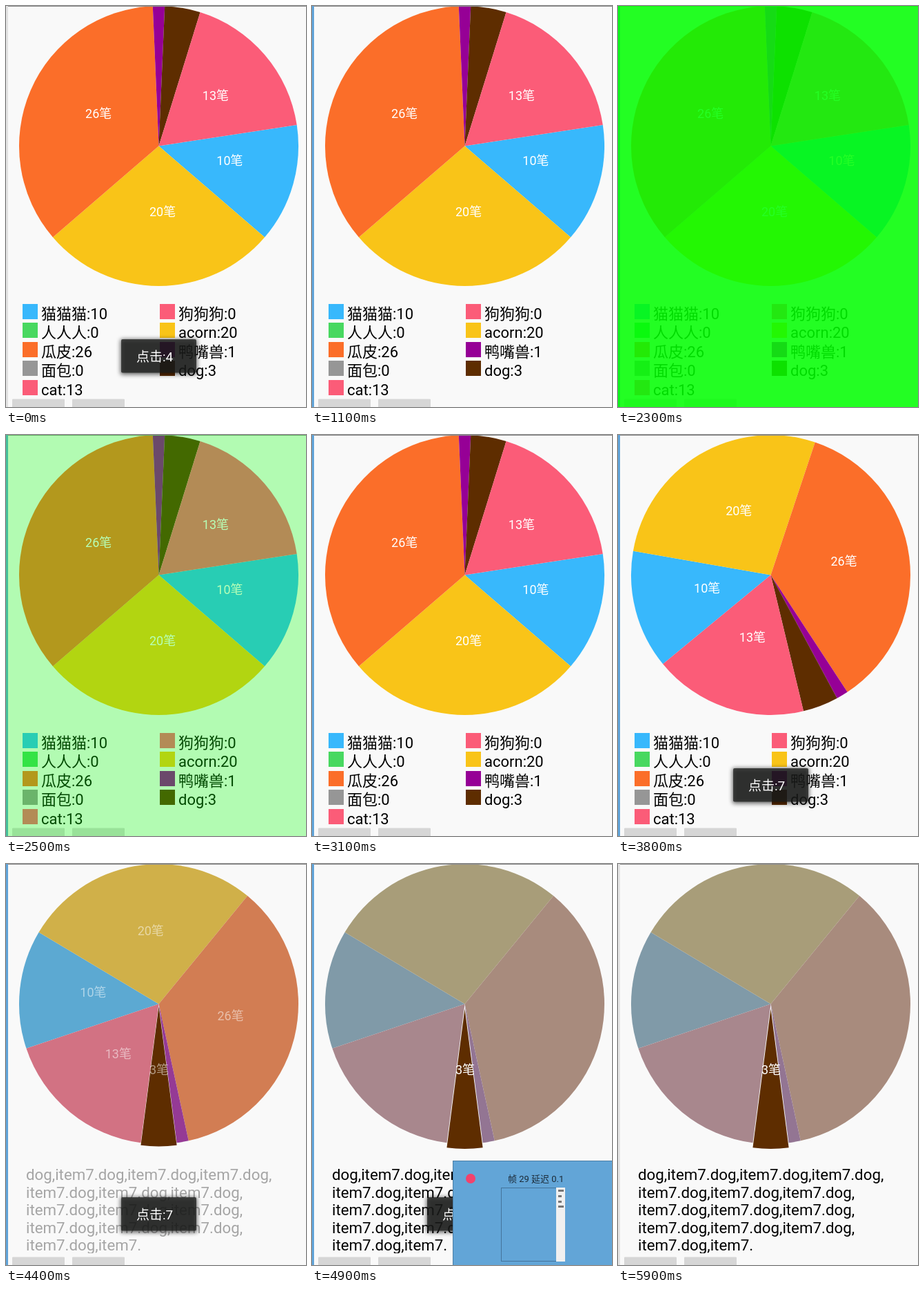
An HTML page for the animation above (7100 ms loop, 435 by 580 pixels).

```html
<!DOCTYPE html>
<html lang="zh-CN">
<head>
<meta charset="utf-8">
<title>Pie chart</title>
<style>
html, body { margin: 0; width: 100%; height: 100%; overflow: hidden; background: #f9f9f9; }
svg { display: block; width: 435px; height: 580px; }
text { font-family: Roboto, "Noto Sans CJK SC", "Noto Sans CJK", sans-serif; white-space: pre; }
</style>
</head>
<body>
<svg id="stage" viewBox="0 0 435 580" xmlns="http://www.w3.org/2000/svg">
  <defs>
    <filter id="soft" x="-20%" y="-40%" width="140%" height="180%"><feGaussianBlur stdDeviation="3"/></filter>
    <clipPath id="detailClip"><rect x="0" y="425" width="435" height="138"/></clipPath>
  </defs>
  <rect width="435" height="580" fill="#f9f9f9"/>
  <g id="pie"></g>
  <g id="labels" font-size="18" fill="#fff"></g>
  <g id="legend" font-size="22"></g>
  <g id="detail" font-size="22.3" clip-path="url(#detailClip)"></g>
  <g fill="#d6d6d6">
    <rect x="9" y="568.5" width="76" height="14" rx="1"/>
    <rect x="96" y="568.5" width="76" height="14" rx="1"/>
  </g>
  <rect width="435" height="1" fill="#8c8c8c"/>
  <g id="toast">
    <rect x="166" y="482" width="111" height="51" rx="2" fill="#000" opacity=".6" filter="url(#soft)"/>
    <rect x="167" y="482" width="109" height="48.5" rx="2" fill="#1c1e1d" fill-opacity=".75"/>
    <text id="toastText" x="189" y="514" font-size="19" fill="#fff"></text>
  </g>
  <rect id="edge" width="3" height="580"/>
  <g id="popup">
    <rect x="204.5" y="429.5" width="232" height="152" fill="#62a5d7" stroke="#4b7ea6"/>
    <circle cx="230" cy="455" r="7" fill="#f2426c"/>
    <text id="popupText" x="284" y="460" font-size="13" fill="#1c2b38"></text>
    <rect x="274.5" y="468.5" width="80" height="106" fill="none" stroke="#44749b"/>
    <rect x="354" y="468" width="13" height="107" fill="#f0f0f0"/>
    <g id="tools" fill="#777"></g>
  </g>
  <rect id="flash" width="435" height="580" fill="#0f0"/>
</svg>
<script>
const LOOP = 7100, STEP = 100;
const CX = 221.5, CY = 202.5, R = 202.5, LABEL_R = 101.25;
const PICKED = 7, FIRST_TURN = -8.63, LAST_TURN = 161.5;
const items = [
  ['猫猫猫', 10, [56, 184, 252]],
  ['狗狗狗', 0, [251, 92, 120]],
  ['人人人', 0, [72, 216, 96]],
  ['acorn', 20, [249, 196, 24]],
  ['瓜皮', 26, [251, 110, 41]],
  ['鸭嘴兽', 1, [150, 0, 150]],
  ['面包', 0, [150, 150, 150]],
  ['dog', 3, [94, 45, 0]],
  ['cat', 13, [251, 92, 120]]
];
const total = items.reduce((sum, item) => sum + item[1], 0);

const $ = id => document.getElementById(id);
const clamp = v => Math.max(0, Math.min(1, v));
const span = (t, from, to) => clamp((t - from) / (to - from));
const ease = p => (1 - Math.cos(Math.PI * p)) / 2;
const mix = (a, b, p) => a + (b - a) * p;
const rgb = c => `rgb(${c.map(Math.round)})`;
const show = (node, alpha) => {
  node.setAttribute('opacity', alpha);
  node.style.display = alpha > 0 ? '' : 'none';
};

function add(parent, tag, attrs, text) {
  const node = document.createElementNS('http://www.w3.org/2000/svg', tag);
  for (const key in attrs) node.setAttribute(key, attrs[key]);
  if (text) node.textContent = text;
  return $(parent).appendChild(node);
}

function polar(deg, r) {
  const a = deg * Math.PI / 180;
  return [CX + r * Math.cos(a), CY + r * Math.sin(a)];
}

let sum = 0;
const slices = [];
items.forEach(([name, value, color], i) => {
  const col = i % 2, row = i >> 1;
  const y = 27.4 * row;
  add('legend', 'rect', { x: col ? 223 : 24, y: Math.round(431 + y), width: 22, height: 22, fill: rgb(color) });
  add('legend', 'text', { x: col ? 250 : 51, y: 453 + y }, `${name}:${value}`);
  if (!value) return;
  const from = sum / total * 360;
  sum += value;
  slices.push({
    from, to: sum / total * 360, color, value,
    picked: i === PICKED,
    path: add('pie', 'path', {}),
    label: add('labels', 'text', {}, value + '笔')
  });
});

const pair = 'item7.dog,';
['dog,' + pair.repeat(3), pair.repeat(3), pair.repeat(3), pair.repeat(3), pair + 'item7.']
  .forEach((line, i) => add('detail', 'text', { x: 29, y: 457 + 25.5 * i }, line));

[471, 479, 487, 494].forEach((y, i) =>
  add('tools', 'rect', { x: 357, y, width: i % 3 ? 5 : 8, height: 3 }));

function drawPie(turn, focus) {
  for (const s of slices) {
    const [x1, y1] = polar(s.from + turn, R);
    const [x2, y2] = polar(s.to + turn, R);
    const mid = (s.from + s.to) / 2 + turn;
    s.path.setAttribute('d', `M${CX} ${CY}L${x1} ${y1}A${R} ${R} 0 0 1 ${x2} ${y2}Z`);
    s.path.setAttribute('fill', rgb(s.picked ? s.color : s.color.map(c => mix(c, c * 0.206 + 116.5, focus))));
    const [px, py] = polar(mid, 7 * focus);
    s.path.setAttribute('transform', s.picked ? `translate(${px - CX} ${py - CY})` : '');
    const [lx, ly] = polar(mid, LABEL_R);
    s.label.setAttribute('x', lx - 13.5);
    s.label.setAttribute('y', ly);
    show(s.label, s.picked ? focus : s.value < 5 ? 0 : 1 - focus);
  }
}

function draw(now) {
  const t = Math.floor(now % LOOP / STEP) * STEP;

  drawPie(mix(FIRST_TURN, LAST_TURN, ease(span(t, 3100, 4007))), ease(span(t, 4000, 4800)));

  const swap = span(t, 4000, 4600);
  show($('legend'), 1 - span(swap, 0, 0.5));
  show($('detail'), span(swap, 0.5, 1));

  const second = t >= 3000;
  $('toastText').textContent = '点击:' + (second ? 7 : 4);
  show($('toast'), second ? span(t, 3100, 3400) * (1 - span(t, 5400, 5900)) : 1 - span(t, 600, 1100));

  $('edge').setAttribute('fill', t >= 500 && t < 5500 ? '#60a3d8' : '#e2e2e2');

  show($('popup'), t < 5500 ? span(t, 4700, 4900) : 0);
  $('popupText').textContent = `帧 ${29 + (t - 4900) / STEP} 延迟 0.1`;

  show($('flash'), t >= 2300 ? 0.86 * (1 - span(t, 2300, 2600)) : 0);
}

const start = performance.now();
function tick() {
  draw(performance.now() - start);
  requestAnimationFrame(tick);
}
tick();
</script>
</body>
</html>
```
